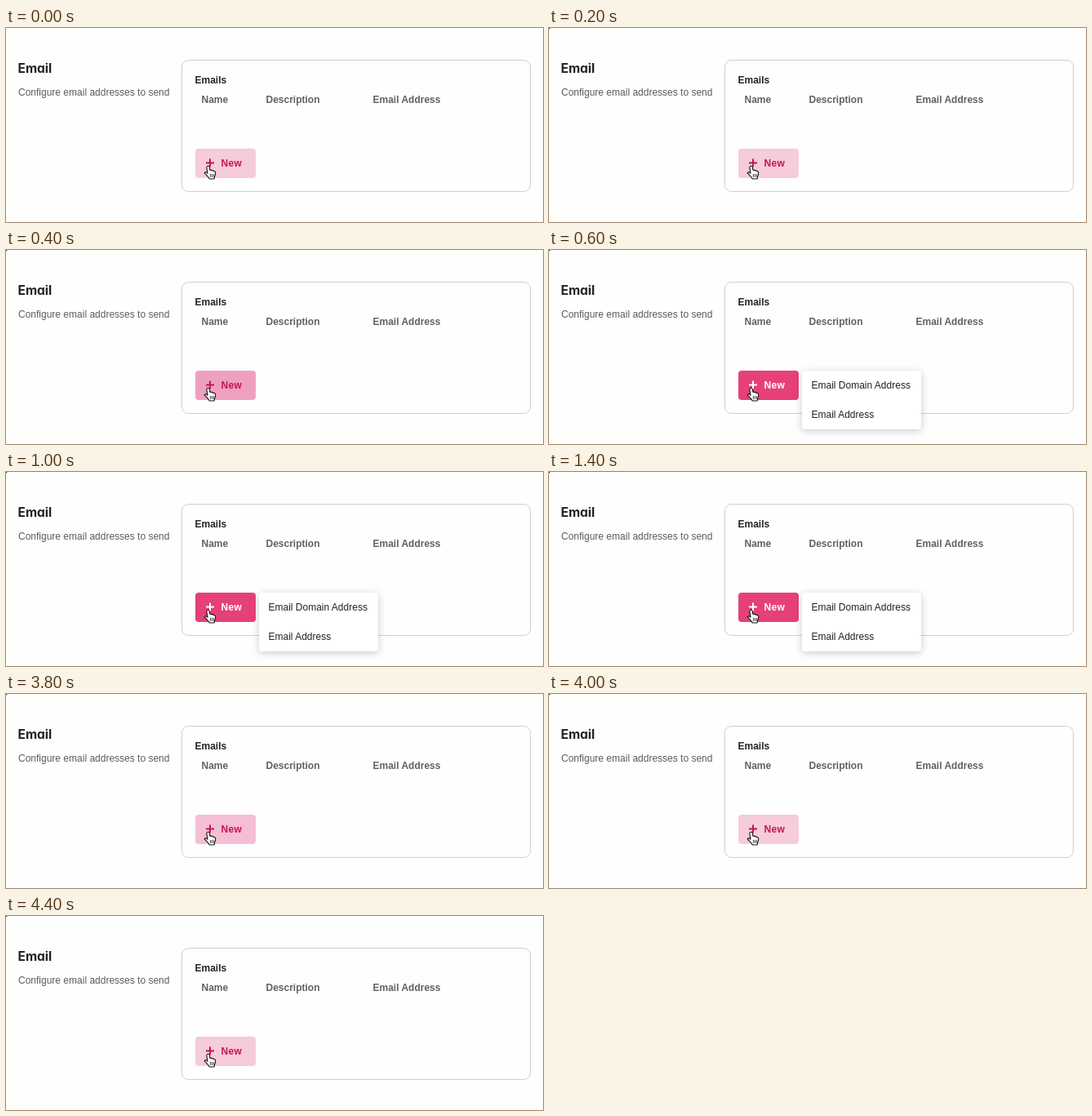
These frames come from a looping animation (658 px wide and 238 px high, 4.8 s). An HTML page:

```html
<!DOCTYPE html>
<html lang="en">
<head>
<meta charset="utf-8">
<title>Email settings</title>
<style>
  html, body { margin: 0; width: 100%; height: 100%; overflow: hidden; background: #fefefd; }
  svg { display: block; position: absolute; left: 0; top: 0; }
  text { font: 12px "Liberation Sans", Arial, sans-serif; fill: #222326; }
  .bold { font-weight: 700; }
  .column { font-weight: 700; fill: #606164; }
  .title { font: 700 15.5px Inter, sans-serif; font-feature-settings: "cv11"; }
  .hint { fill: #5b5c60; }
  #label text { fill: inherit; font-weight: 700; letter-spacing: .3px; }
  #menu { visibility: hidden; }
  #menu rect { fill: #fff; filter: drop-shadow(0 2px 5px rgba(70, 70, 95, .28)); }
</style>
</head>
<body>
<svg width="658" height="238" viewBox="0 0 658 238">
  <rect id="dot" width="1" height="1" fill="#000"/>

  <text class="title" x="14.5" y="55">Email</text>
  <text class="hint" x="15" y="83">Configure email addresses to send</text>

  <rect x="215.5" y="39.5" width="427" height="161" rx="8" fill="none" stroke="#cfcfd1"/>
  <text class="bold" x="231.5" y="68">Emails</text>
  <text class="column" x="239.5" y="92">Name</text>
  <text class="column" x="318.5" y="92">Description</text>
  <text class="column" x="449.5" y="92">Email Address</text>

  <rect id="button" x="232" y="148" width="74" height="36" rx="4" fill="#f6cbdc"/>
  <g id="label" fill="#c4144f">
    <path d="M249 160.5h2v4h4v2h-4v4h-2v-4h-4v-2h4z"/>
    <text x="263.5" y="170">New</text>
  </g>

  <g id="menu">
    <rect x="310" y="148" width="146" height="72" rx="4"/>
    <text x="321.5" y="170">Email Domain Address</text>
    <text x="321.5" y="206">Email Address</text>
  </g>

  <g transform="translate(242 168)" stroke="#111" stroke-linejoin="round" stroke-linecap="round">
    <path fill="#fff" stroke-width="1.1" d="M5 1.4C6.2.8 7 1.6 7.2 2.6L8 6.4C8.8 5.8 10 6.1 10.3 7C11.2 6.5 12.2 6.9 12.5 7.7C13.5 7.3 14.6 8 14.7 9.2C14.9 11.5 14.3 13 13.5 14.6L13.2 17H7.2C6.5 15 5 14 3.6 12.4C2.8 11.4 1.4 10.5 1.3 9.8C1.4 8.6 3 8.6 4 9.4L5 10.2L3.9 3.6C3.7 2.6 4 1.8 5 1.4Z"/>
    <path fill="none" stroke-width=".8" d="M8.4 11.3v3.2M10.4 11.3v3.2M12.4 11.3v3.2"/>
  </g>
</svg>
<script>
  const LOOP = 4800;
  const CRIMSON = '#c4144f';

  // Each track lists [time in ms, value]; a value holds until the next step.
  const tracks = [
    ['dot', 'opacity', [[0, 0], [200, 1]]],
    ['button', 'fill', [[0, '#f6cbdc'], [400, '#efa0c1'], [600, '#e64078'], [3800, '#f4bed4'], [4000, '#f6cbdc']]],
    ['label', 'fill', [[0, CRIMSON], [600, '#fff'], [3800, CRIMSON]]],
    ['menu', 'visibility', [[0, 'hidden'], [600, 'visible'], [3800, 'hidden']]],
  ];

  for (const [id, prop, steps] of tracks) {
    const frames = [...steps, [LOOP, steps.at(-1)[1]]].map(([time, value]) => ({
      offset: time / LOOP, [prop]: value, easing: 'step-end',
    }));
    const anim = document.getElementById(id).animate(frames, { duration: LOOP, iterations: Infinity });
    anim.startTime = 0;
  }
</script>
</body>
</html>
```
